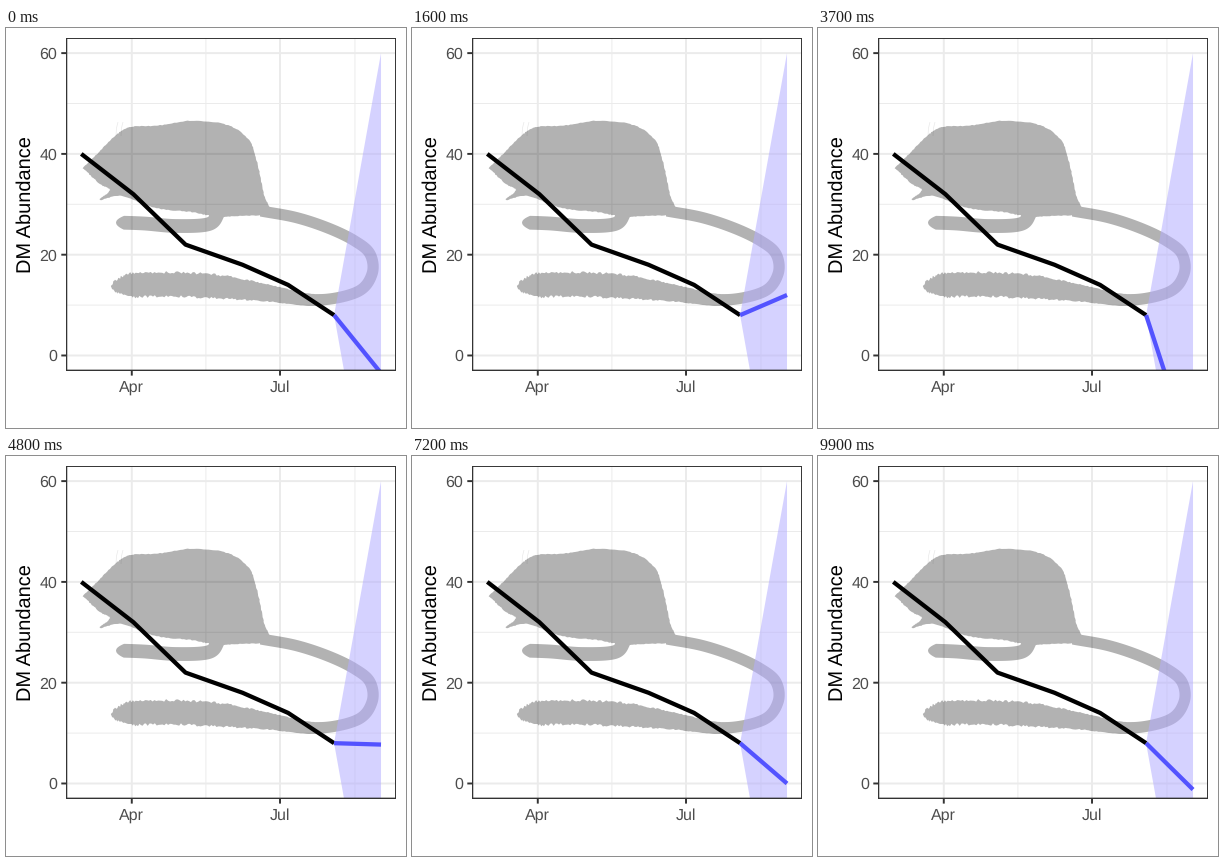
A matplotlib script for the animation above (10000 ms loop, 400 px wide and 400 px high).

```python
import numpy as np
import matplotlib.pyplot as plt
from matplotlib.animation import FuncAnimation
from matplotlib.patches import PathPatch, Polygon, Rectangle
from matplotlib.path import Path

plt.rcParams.update({"path.snap": False, "font.family": "Liberation Sans",
                     "text.hinting": "none", "text.hinting_factor": 1})

SIZE, DPI, FRAMES = 400, 100, 100
PT = 72 / DPI  # points per pixel
LEFT, RIGHT, TOP, BOTTOM = 60.3, 390, 10, 342.6

GRID, DARK, LABEL = "#EBEBEB", "#333333", "#4D4D4D"
BLUE, BAND = "#5353FF", "#B4ADFF"
THIN, LINE, BOLD = 0.97, 1.94, 4.27


def day_x(day):
    """Pixel x of a day counted from 1 March."""
    return LEFT + (RIGHT - LEFT) * (day + 9.2) / 202.4


def val_y(value):
    """Pixel y of an abundance."""
    return BOTTOM - (BOTTOM - TOP) * (value + 3) / 66


fig = plt.figure(figsize=(SIZE / DPI, SIZE / DPI), dpi=DPI, facecolor="white")
ax = fig.add_axes([0, 0, 1, 1])
ax.set_xlim(0, SIZE)
ax.set_ylim(SIZE, 0)
ax.axis("off")
# Everything in the panel is clipped to whole pixels
clip = Rectangle((60, 10), 330, 333, transform=ax.transData)


def add(art):
    ax.add_artist(art)
    art.set_clip_path(clip)


def line(xs, ys, color, width, z, clipped=True, **kw):
    art, = ax.plot(xs, ys, color=color, lw=width * PT, zorder=z,
                   solid_capstyle="butt", solid_joinstyle="round", **kw)
    if clipped:
        art.set_clip_path(clip)
    return art


def label(x, y, text, px, color, ha, **kw):
    ax.text(x, y, text, fontsize=px * PT, color=color, ha=ha, va="baseline",
            rotation_mode="anchor", **kw)


# Frame, grid, ticks and labels
add(Rectangle((LEFT, TOP), RIGHT - LEFT, BOTTOM - TOP,
              fc="none", ec=DARK, lw=LINE * PT, zorder=9))
for v in (10, 30, 50):
    line([LEFT, RIGHT], [val_y(v)] * 2, GRID, THIN, 1)
for d in (76.5, 168):
    line([day_x(d)] * 2, [TOP, BOTTOM], GRID, THIN, 1)
for v in range(0, 61, 20):
    y = val_y(v)
    line([LEFT, RIGHT], [y, y], GRID, LINE, 1)
    line([LEFT - 5, LEFT], [y, y], DARK, LINE, 1, clipped=False)
    label(51.3, y + 5.7, str(v), 16, LABEL, "right")
for d, month in ((31, "Apr"), (122, "Jul")):
    x = day_x(d)
    line([x, x], [TOP, BOTTOM], GRID, LINE, 1)
    line([x, x], [BOTTOM, BOTTOM + 5], DARK, LINE, 1, clipped=False)
    label(x, 363.6, month, 16, LABEL, "center")
label(24.3, (TOP + BOTTOM) / 2, "DM Abundance", 20, "black", "center",
      rotation=90)


# Rodent silhouette
rng = np.random.default_rng(4)


def smooth(keys, n=300):
    """Catmull-Rom curve through the key points."""
    p = np.array(keys, float)
    p = np.vstack([2 * p[0] - p[1], p, 2 * p[-1] - p[-2]])
    s = np.linspace(0, len(keys) - 1, n)
    i = np.minimum(s.astype(int), len(keys) - 2)
    t = (s - i)[:, None]
    a, b, c, d = (p[i + k] for k in range(4))
    return 0.5 * (2 * b + (c - a) * t + (2 * a - 5 * b + 4 * c - d) * t ** 2
                  + (3 * b - a - 3 * c + d) * t ** 3)


def limb(keys, half, fur=0.0):
    """Outline of a curve with a half width, rounded off at its far end."""
    mid = smooth(keys)
    u = np.linspace(0, 1, len(mid))
    step = np.gradient(mid, axis=0)
    normal = np.stack([-step[:, 1], step[:, 0]], axis=1)
    normal /= np.hypot(*step.T)[:, None]
    width = half * np.sqrt(np.minimum(1, 14 * (1 - u)))
    sides = [mid + k * normal * (width + fur * rng.uniform(-1, 1, len(u)))[:, None]
             for k in (1, -1)]
    return np.vstack([sides[0], sides[1][::-1]])


def closed(points):
    """Closed path, always wound the same way so that overlaps merge."""
    x, y = points.T
    if np.sum(x * np.roll(y, -1) - y * np.roll(x, -1)) < 0:
        points = points[::-1]
    return Path(np.vstack([points, points[:1]]), closed=True)


def ease(t):
    t = np.clip(t, 0, 1)
    return t * t * (3 - 2 * t)


body = smooth([(76.5, 140), (91, 126), (110, 107), (125, 99), (152, 97.5),
               (185, 92.8), (221, 97), (243, 112), (252, 138), (258, 167),
               (263, 185), (232, 188), (207, 188), (185, 184), (150, 180),
               (115, 168), (94, 172), (104, 162), (94, 156), (76.5, 140)])
body += rng.uniform(-0.4, 0.4, body.shape)
foot = limb([(213, 184), (203, 196), (170, 198), (138, 195.5), (110, 194.5)], 6.9)
tuft = ease((np.linspace(0, 1, 300) - 0.55) / 0.25)
tail = limb([(255, 183), (290, 189.5), (322, 200), (348, 212.5), (364, 226),
             (366, 246), (351, 264), (310, 272), (262, 265), (220, 259.5),
             (175, 256.5), (130, 257), (105, 259)], 5.6 + 6.4 * tuft, 1.3 * tuft)
rodent = Path.make_compound_path(closed(body), closed(foot), closed(tail))
add(PathPatch(rodent, fc="black", ec="none", lw=0, alpha=0.3, zorder=2))
for x in (110, 115):
    line([x, x + 0.5, x + 2], [108, 100, 94], "black", 0.8, 2, alpha=0.08)

# Forecast band and observed counts
START, END, LAST = day_x(155.2), day_x(184), 8
add(Polygon([(START, val_y(LAST)), (END, val_y(LAST + 52)), (END, val_y(LAST - 52))],
            fc=BAND, ec="none", lw=0, alpha=0.55, zorder=3))
days = np.array([0, 32, 64, 99, 127, 155.2])
counts = np.array([40, 32, 22, 18, 14, LAST])
line(day_x(days), val_y(counts), "black", BOLD, 4)

# Simulated outcomes, blended linearly from one draw to the next
draws = [-3.5, 8, 49, 12, 22, 53, 21, -21, -18, -0.6,
         41, 19.5, 17, 12, -3, 55, 6.6, -22, 28, -1.2]
keys = np.round(np.linspace(0, FRAMES - 1, len(draws)))
outcome = line([START, END], [val_y(LAST)] * 2, BLUE, BOLD, 5)


def update(frame):
    value = np.interp(frame, keys, draws)
    outcome.set_ydata([val_y(LAST), val_y(value)])
    return outcome,


anim = FuncAnimation(fig, update, frames=FRAMES, interval=100,
                     repeat=True, repeat_delay=0)
plt.show()
```
